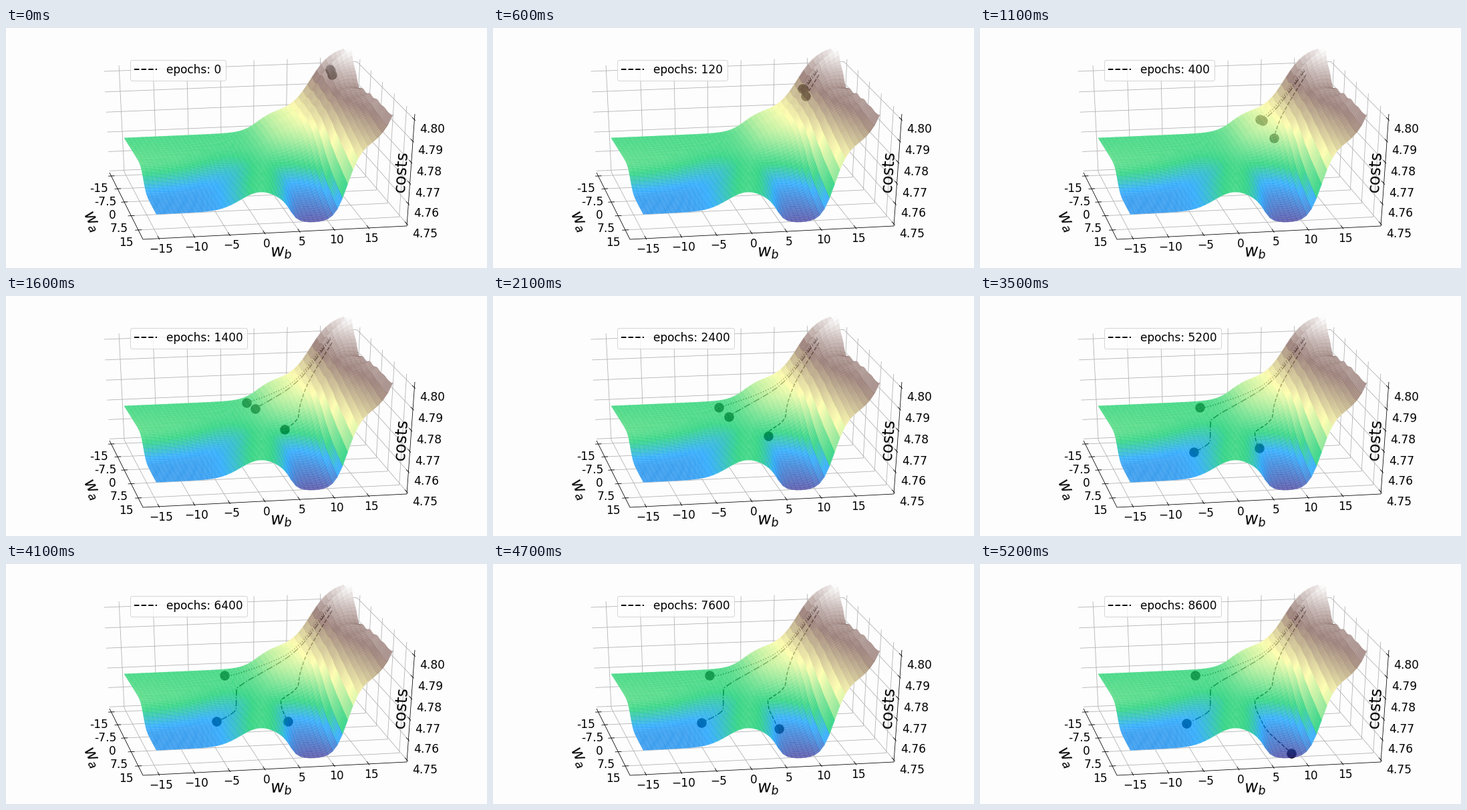
Write a matplotlib script that moves like this. It is 720x360 px and loops after 5.3 s.

```python
import numpy as np
import matplotlib.pyplot as plt
from matplotlib.animation import FuncAnimation
from matplotlib.collections import LineCollection, PolyCollection
from matplotlib.lines import Line2D

WIDTH, HEIGHT, DPI = 720, 360, 72
FRAMES, INTERVAL = 53, 100
CELLS = 50
FONT = 17
PAPER = "#fdfdfd"


def project(u, v, w):
    """Perspective view of the unit box: u to the front, v right, w up."""
    den = 1 - 0.084 * u + 0.018 * v - 0.0433 * w
    x = (155 + 32.78 * u + 372.62 * v - 15.32 * w) / den
    y = (217 + 73.37 * u - 13.0 * v - 162.47 * w) / den
    return np.stack(np.broadcast_arrays(x, y), axis=-1)


def u_of(a):
    return 0.054 + 0.0272 * (a + 15)


def v_of(b):
    return 0.4564 + 0.02645 * b


def w_of(z):
    return 0.0175 + 18.69 * (z - 4.75)


def step_up(x, center, width):
    return 1 / (1 + np.exp((center - x) / width))


def bump(x, center, width):
    return np.exp(-((x - center) / width) ** 2)


def back_profile(t):
    return 0.36 + 0.19 * step_up(t, 0.612, 0.035) + 0.54 * step_up(t, 0.853, 0.043)


def front_profile(s, t):
    # The crest leans to the right and the basin gets shallower towards the back.
    lean = t - 0.2 * (1 - s) * bump(t, 0.5, 0.2)
    crest = 0.157 * bump(lean, 0.445, 0.12)
    basin = 0.15 * s ** 3 * step_up(lean, 0.575, 0.015)
    wall = 0.66 * step_up(t, 0.82, 0.025) + 0.28 * t ** 20
    return 0.19 + crest - basin + wall


def height(s, t):
    """Surface height, s from back to front and t from left to right."""
    edge = 0.56 + 0.06 * (1 - t) ** 3 - 0.17 * bump(t, 0.45, 0.2)
    c = step_up(s, edge, 0.035 + 0.085 * t ** 1.5)
    w = back_profile(t) * (1 - c) + front_profile(s, t) * c
    w += 0.07 * s * (1 - c) * (1 - t) ** 2
    rim = 0.08 * bump(s, 0.13, 0.08) - 0.22 * step_up(s, 0.27, 0.03) * np.sqrt(1 - s)
    w += rim * np.clip((t - 0.8) / 0.2, 0, 1) ** 2
    return w + 0.022 * t ** 4 * (1 - s) * np.cos(2 * np.pi * s / 0.14)


def add_surface(ax):
    grid = np.linspace(0, 1, CELLS + 1)
    s, t = np.meshgrid(grid, grid[::-1], indexing="ij")
    w = height(s, t)
    p = project(u_of(-15 + 33 * s), v_of(-15 + 33 * t), w)
    quads = np.stack([p[:-1, :-1], p[1:, :-1], p[1:, 1:], p[:-1, 1:]], axis=2)
    quads = quads.reshape(-1, 4, 2)
    mean = (w[:-1, :-1] + w[1:, :-1] + w[1:, 1:] + w[:-1, 1:]).ravel() / 4
    shade = (mean - mean.min()) / (mean.max() - mean.min())
    colors = plt.get_cmap("terrain")(shade)
    colors[:, 3] = 0.7
    # A paper layer hides the grid; the trails lie between it and the colours.
    ax.add_collection(PolyCollection(quads, facecolors=PAPER, edgecolors=PAPER,
                                     linewidths=0.3, zorder=2), autolim=False)
    ax.add_collection(PolyCollection(quads, facecolors=colors, edgecolors=colors,
                                     linewidths=0.3, zorder=4), autolim=False)


def add_lines(ax, lines, color, zorder):
    segments = [[project(*p) for p in line] for line in lines]
    ax.add_collection(LineCollection(segments, colors=color, linewidths=0.8,
                                     zorder=zorder), autolim=False)


def add_label(ax, point, shift, text):
    x, y = point
    ax.text(x + shift[0], y + shift[1] + 6, text, fontsize=FONT,
            ha="center", va="baseline")


def add_box(ax):
    grid, marks = [], []

    for a in np.arange(-15, 16, 7.5):
        u = u_of(a)
        grid.append([(u, 0, 0), (u, 1, 0), (u, 1, 1)])
        marks.append([(u, -0.012, 0), (u, 0.013, 0)])
        add_label(ax, project(u, 0, 0), (-18, 18.5), f"{a:g}")
    for b in range(-15, 16, 5):
        v = v_of(b)
        grid.append([(1, v, 0), (0, v, 0), (0, v, 1)])
        marks.append([(0.965, v, 0), (1.015, v, 0)])
        add_label(ax, project(1, v, 0), (3.5, 15), f"{b}".replace("-", "\u2212"))
    for i in range(6):
        z = 4.75 + 0.01 * i
        w = w_of(z)
        grid.append([(0, 0, w), (0, 1, w), (1, 1, w)])
        marks.append([(0.965, 1, w), (1.015, 1, w)])
        add_label(ax, project(1, 1, w), (26.5, 13.5), f"{z:.2f}")

    add_lines(ax, grid, "#b0b0b0", 1)
    add_lines(ax, marks, "black", 1)
    add_lines(ax, [[(0, 0, 0), (1, 0, 0), (1, 1, 0), (1, 1, 1)]], "black", 1)

    for x, y, text, size, angle in [(127, 290, "$w_a$", 25, -63.4),
                                    (412, 337, "$w_b$", 25, 2.9),
                                    (592, 215, "costs", 24, 86)]:
        ax.text(x, y, text, fontsize=size, rotation=angle, ha="center", va="center")


def glide(x, xs, ys):
    """Smooth curve through the key points that never overshoots them."""
    h = np.diff(xs)
    d = np.diff(ys) / h
    prod = d[:-1] * d[1:]
    total = np.where(prod > 0, d[:-1] + d[1:], 1)
    inner = np.where(prod > 0, 2 * prod / total, 0)
    m = np.concatenate([d[:1], inner, d[-1:]])
    i = np.clip(np.searchsorted(xs, x, "right") - 1, 0, len(xs) - 2)
    t = (x - xs[i]) / h[i]
    return (ys[i] * (1 + 2 * t) * (1 - t) ** 2 + ys[i + 1] * t * t * (3 - 2 * t)
            + h[i] * (m[i] * t * (1 - t) ** 2 - m[i + 1] * t * t * (1 - t)))


# Key points of each descent: step, x, y.
DOTTED = [(0, 485, 62), (10, 442, 118), (11, 419, 136.5), (13, 384, 152),
          (21, 338, 167), (52, 322, 167.4)]
DASHDOT = [(0, 486, 64), (10, 445, 119), (11, 423, 139), (13, 392, 158),
           (21, 353, 181), (24, 345, 189), (27, 344.5, 217), (29, 328, 230.5),
           (41, 315, 236.4), (52, 309, 238.5)]
DASHED = [(0, 488, 70), (10, 451, 133), (11, 440, 165), (12, 437, 183),
          (18, 411.5, 205), (41, 421.5, 236), (48, 429.5, 249.5), (52, 466, 283.5)]


class Descent:
    def __init__(self, ax, keys, style):
        self.n, self.x, self.y = np.array(keys, float).T
        self.trail, = ax.plot([], [], "k", ls=style, lw=1.5, zorder=3)
        self.ball, = ax.plot([], [], "ko", ms=14.5, mew=0, zorder=3)

    def move(self, step):
        n = np.linspace(0, step, 8 * step + 2)
        x, y = glide(n, self.n, self.x), glide(n, self.n, self.y)
        self.trail.set_data(x, y)
        self.ball.set_data(x[-1:], y[-1:])


fig = plt.figure(figsize=(WIDTH / DPI, HEIGHT / DPI), dpi=DPI, facecolor=PAPER)
ax = fig.add_axes([0, 0, 1, 1])
ax.set_axis_off()
ax.set_xlim(0, WIDTH)
ax.set_ylim(HEIGHT, 0)
ax.set_autoscale_on(False)

add_box(ax)
add_surface(ax)
descents = [Descent(ax, DOTTED, ":"), Descent(ax, DASHDOT, "-."),
            Descent(ax, DASHED, "--")]
legend = ax.legend(handles=[Line2D([], [], color="k", ls="--", lw=2)],
                   labels=["epochs: 0"], fontsize=FONT, loc="upper left",
                   bbox_to_anchor=(185.5, 47.5), bbox_transform=ax.transData,
                   borderaxespad=0)
counter = legend.get_texts()[0]


def update(step):
    # Early steps are fine-grained, later ones ten times longer.
    epochs = 20 * step if step < 10 else 200 * (step - 9)
    counter.set_text(f"epochs: {epochs}")
    for descent in descents:
        descent.move(step)
    return []


anim = FuncAnimation(fig, update, frames=FRAMES, interval=INTERVAL, repeat=True)
plt.show()
```
